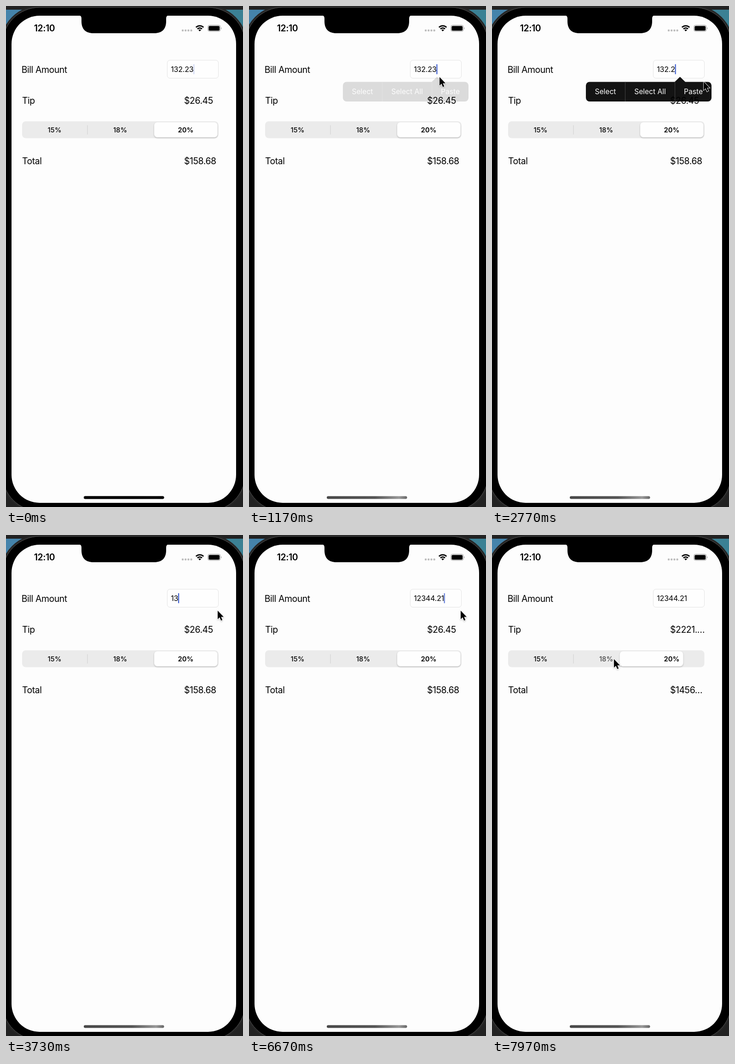
Recreate the animation shown at these times as an HTML page. Size 515x1086 px, loop 8 s.

```html
<!DOCTYPE html>
<html lang="en">
<head>
<meta charset="utf-8">
<title>Tip calculator</title>
<style>
  html, body { margin: 0; height: 100%; overflow: hidden; background: #000; }
  svg { display: block; width: 100vw; height: 100vh; font-family: Inter, sans-serif; }
  .label { font-size: 19.4px; letter-spacing: -.42px; }
  .segment { font-size: 14.8px; font-weight: 500; text-anchor: middle; }
  .menu { font-size: 15.6px; fill: #fff; text-anchor: middle; }
  #amount { font-size: 16px; letter-spacing: -.2px; }
</style>
</head>
<body>
<svg viewBox="0 0 515 1086">
  <defs>
    <linearGradient id="desktop">
      <stop offset="0" stop-color="#4583ab"/>
      <stop offset="1" stop-color="#3b8194"/>
    </linearGradient>
    <linearGradient id="homeFill">
      <stop offset="0" stop-color="#484848"/>
      <stop offset=".6" stop-color="#555"/>
      <stop offset=".9" stop-color="#999"/>
      <stop offset="1" stop-color="#666"/>
    </linearGradient>
    <filter id="shadow" x="-30%" y="-30%" width="160%" height="170%">
      <feDropShadow dx="0" dy="1.5" stdDeviation="1.5" flood-opacity=".25"/>
    </filter>
  </defs>

  <!-- desktop and phone body -->
  <rect width="515" height="1086" fill="#222"/>
  <rect y="8" width="515" height="60" fill="url(#desktop)"/>
  <rect x="-9" y="2" width="530" height="1094" rx="82" stroke="#262626" stroke-width="6"/>
  <rect x="-8" y="3" width="528" height="1092" rx="81" stroke="#555" stroke-width="1"/>
  <rect x="12" y="21" width="488" height="1056" rx="61" fill="#fdfdfd"/>
  <path d="M157 20q7 0 7 7v6c0 17 9 26 26 26h132c17 0 26-9 26-26v-6q0-7 7-7z"/>

  <!-- status bar -->
  <text class="label" x="83.5" y="55" font-weight="600" text-anchor="middle">12:10</text>
  <path d="M384 53h20" stroke="#bdbdbd" stroke-width="4.4" stroke-linecap="round" stroke-dasharray="0 6.2"/>
  <g fill="none" stroke="#000" stroke-width="2.8">
    <path d="M412.8 46.3a11.6 11.6 0 0 1 16.4 0M416 49.8a7 7 0 0 1 10 0"/>
    <path d="M421 55l-2.9-2.9a4.1 4.1 0 0 1 5.8 0z" fill="#000" stroke="none"/>
  </g>
  <rect x="438.5" y="41.5" width="27.5" height="13.5" rx="4" fill="none" stroke="#999"/>
  <rect x="440.2" y="43.2" width="24" height="10.2" rx="2.5"/>
  <path d="M467.5 46q2.2 2.3 0 4.6z" fill="#999"/>

  <!-- form -->
  <g class="label">
    <text x="33.8" y="144.8">Bill Amount</text>
    <text x="35" y="212">Tip</text>
    <text x="35" y="343.2">Total</text>
    <text id="tip" x="387" y="212"></text>
    <text id="total" x="387" y="343.2"></text>
  </g>
  <rect x="350.5" y="117.5" width="111" height="39" rx="5.5" fill="#fefefe" stroke="#e4e4e4"/>
  <text id="amount" x="358.3" y="143"></text>
  <rect id="caret" y="126" width="2.2" height="22" rx="1" fill="#3e5fd0"/>

  <rect x="35" y="250" width="426.500" height="36.500" rx="8" fill="#ebebeb"/>
  <path d="M177 258.500v20" stroke="#cfcfcf"/>
  <rect id="knob" x="322" y="252" width="137.500" height="32.500" rx="7" fill="#fefefe" filter="url(#shadow)"/>
  <g class="segment">
    <text x="105.500" y="273.700">15%</text>
    <text id="middle" x="248" y="273.700">18%</text>
    <text x="390.500" y="273.700" font-weight="600">20%</text>
  </g>

  <!-- home indicator -->
  <rect x="169" y="1062.500" width="174.500" height="6" rx="3" fill="url(#homeFill)"/>
  <rect id="home" x="169" y="1062.500" width="174.500" height="6" rx="3"/>

  <g id="menu">
    <path d="M212 164.500H397L408.500 153.500L420 164.500H469a8 8 0 0 1 8 8V199a8 8 0 0 1-8 8H212a8 8 0 0 1-8-8V172.500a8 8 0 0 1 8-8z"/>
    <path d="M289.500 164.500V207M397.500 164.500V207" stroke="#333"/>
    <g class="menu">
      <text x="246.500" y="191.200">Select</text>
      <text x="343.500" y="191.200">Select All</text>
      <text x="437.500" y="191.200">Paste</text>
    </g>
  </g>

  <path id="pointer" d="M1 1V19.500L5.200 15.600L8.200 22.600L11.300 21.200L8.300 14.400H14Z" stroke="#fff" stroke-width="1.600" paint-order="stroke" filter="url(#shadow)"/>
</svg>

<script>
const LOOP = 8000, TAP = 7860;
const el = id => document.getElementById(id);
const clamp = x => Math.min(1, Math.max(0, x));
const ramp = (t, from, to) => clamp((t - from) / (to - from));
const smooth = x => x * x * (3 - 2 * x);

// [time, field text]; each entry also restarts the caret blink
const edits = [
  [-650, "132.23"], [880, "132.23"],
  [2740, "132.2"], [3000, "132."], [3250, "132"], [3500, "13"], [3880, "1"], [4080, ""],
  [4500, "1"], [4680, "12"], [4850, "123"], [5010, "1234"],
  [5200, "12344"], [5360, "12344."], [5530, "12344.2"], [5700, "12344.21"]
];

// [time, x, y] of the pointer tip
const stops = [
  [200, 520, 300], [880, 413, 153], [1180, 413, 153], [1430, 444, 159],
  [1650, 459, 163], [6950, 459, 163], [7680, 264, 268], [LOOP, 264, 268]
];

function pointerAt(t) {
  const i = Math.max(1, stops.findIndex(s => s[0] >= t));
  const [t0, x0, y0] = stops[i - 1], [t1, x1, y1] = stops[i];
  const k = smooth(ramp(t, t0, t1));
  return [x0 + (x1 - x0) * k, y0 + (y1 - y0) * k];
}

function blink(elapsed) {
  const phase = elapsed % 1000;
  return phase < 700 ? 1 - ramp(phase, 500, 700) : ramp(phase, 850, 1000);
}

function draw(t) {
  const [editTime, text] = edits.filter(e => e[0] <= t).pop();
  const tapped = t >= TAP;

  el("amount").textContent = text;
  el("caret").setAttribute("x", 358 + (text ? el("amount").getComputedTextLength() : 0));
  el("caret").style.opacity = tapped ? 0 : blink(t - editTime);

  el("tip").textContent = tapped ? "$2221.…" : "$26.45";
  el("total").textContent = tapped ? "$1456…" : "$158.68";
  el("knob").setAttribute("x", 322 - 143 * smooth(ramp(t, TAP, TAP + 300)));
  el("middle").style.opacity = t >= TAP - 60 ? .7 : 1;

  el("menu").style.opacity = ramp(t, 1150, 1310) * (1 - ramp(t, 2755, 2960));
  el("home").style.opacity = 1 - ramp(t, 150, 650);

  const [x, y] = pointerAt(t);
  el("pointer").setAttribute("transform", `translate(${x} ${y})`);
}

function tick() {
  draw(performance.now() % LOOP);
  requestAnimationFrame(tick);
}
tick();
</script>
</body>
</html>
```
